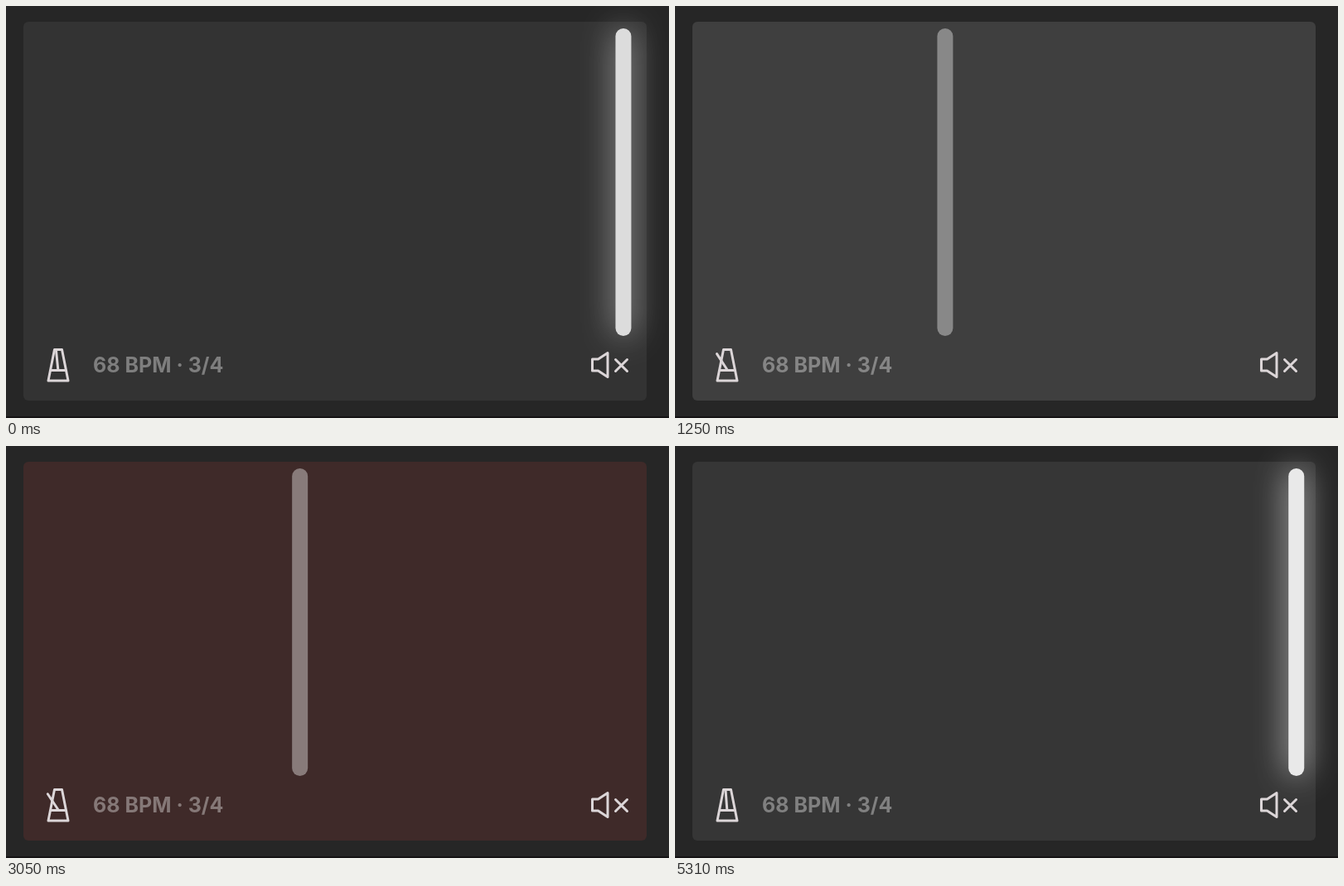
These frames come from a looping animation (800x497 px, 5.37 s). An HTML page:

```html
<!DOCTYPE html>
<html lang="en">
<head>
<meta charset="utf-8">
<title>Metronome</title>
<style>
  html, body { margin: 0; width: 100%; height: 100%; overflow: hidden; background: #262626; }
  #stage { position: relative; width: 800px; height: 497px; overflow: hidden; }
  #stage::after { content: ""; position: absolute; left: 0; right: 0; bottom: 0; height: 2px; background: #151314; }
  #card { position: absolute; left: 21px; top: 19px; width: 752px; height: 457px; border-radius: 6px; background: #333; }
  #bar { position: absolute; left: -9.5px; top: 27px; width: 19px; height: 371px; border-radius: 9.5px; background: #fff; }
  svg { position: absolute; left: 0; top: 0; }
  .icon { fill: none; stroke: #dcd6d8; stroke-width: 3; stroke-linecap: round; stroke-linejoin: round; }
  text { font: 700 25px Inter, "Liberation Sans", sans-serif; fill: #fff; fill-opacity: .37; }
</style>
</head>
<body>
<div id="stage">
  <div id="card"></div>
  <div id="bar"></div>
  <svg width="800" height="497" viewBox="0 0 800 497">
    <g class="icon">
      <path d="M58.5 414.5H67.5L75 452H51ZM54 439.5H72.5"/>
      <path id="arm" d="M62.8 438.5V416"/>
      <path d="M707.5 426H714.5L726 418.5V447.5L714.5 440H707.5Z"/>
      <path d="M735.5 426.5L749.5 440.5M749.5 426.5L735.5 440.5"/>
    </g>
    <text x="105" y="442">68 BPM · 3/4</text>
  </svg>
</div>
<script>
  const LOOP = 5370, STEP = 50, BEAT = 60000 / 68, FIRST = 14.8;
  const LEFT = 38.2, SPAN = 718.3;
  const BASE = [51, 51, 51], PLAIN = [81, 81, 81], ACCENT = [82, 26, 24];
  const [card, bar, arm] = ["card", "bar", "arm"].map(id => document.getElementById(id));

  // The picture advances in 50 ms steps; the last two last 60 ms.
  function stepTime(ms) {
    const t = ms % LOOP;
    return t >= 5310 ? 5300 : Math.min(5250, Math.floor(t / STEP) * STEP);
  }

  function draw(t) {
    const beats = (t - FIRST) / BEAT;
    const count = Math.floor(beats);
    const frac = beats - count;
    const cycle = (beats + 2) % 2;
    const pos = Math.abs(1 - cycle);
    const gap = Math.min(frac, 1 - frac) * BEAT;

    bar.style.transform = `translateX(${LEFT + SPAN * pos}px)`;
    bar.style.opacity = 0.38 + 0.62 * Math.exp(-gap / 47);
    const glow = pos > 0.5 ? Math.exp(-gap / 40) : 0;
    bar.style.boxShadow = `0 0 38px rgba(255,255,255,${glow.toFixed(4)})`;

    // The first beat of each measure flashes red.
    const flash = count < 0 ? 0 : Math.exp(-frac * BEAT / 400);
    const peak = count % 3 ? PLAIN : ACCENT;
    const rgb = BASE.map((c, i) => Math.round(c + (peak[i] - c) * flash));
    card.style.background = `rgb(${rgb})`;

    const side = cycle < 1 ? 1 : -1;
    const angle = side * 34 * Math.sin(Math.PI * frac) ** 0.6;
    arm.setAttribute("transform", `rotate(${angle} 62.8 438.5)`);
  }

  function tick() {
    draw(stepTime(performance.now()));
    requestAnimationFrame(tick);
  }
  tick();
</script>
</body>
</html>
```
